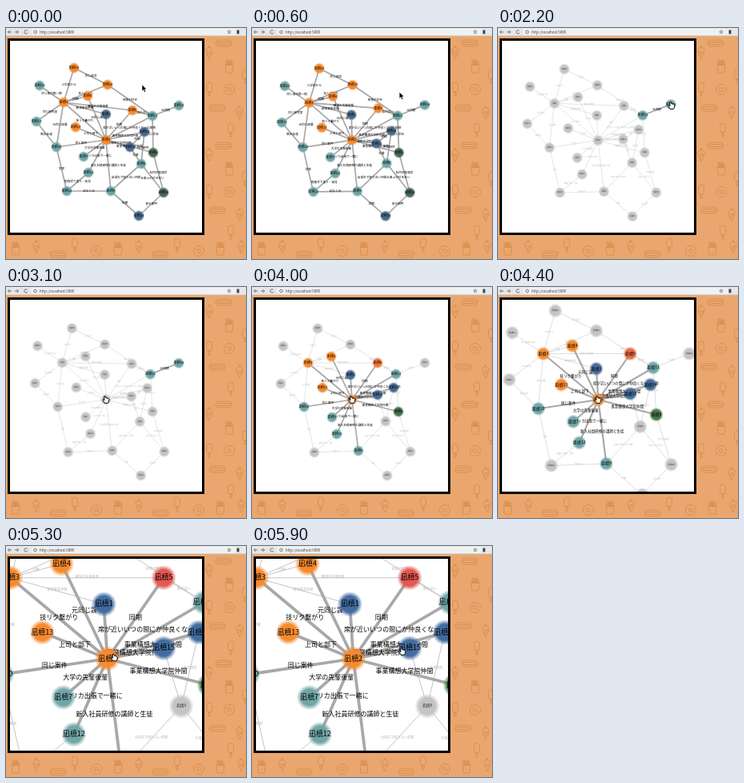
Recreate the animation shown at these times as an HTML page with a canvas. Size 300 px wide and 289 px high, loop 6 s.

```html
<!DOCTYPE html>
<html lang="ja">
<head>
<meta charset="utf-8">
<title>Graph</title>
<style>
html, body { margin: 0; width: 100%; height: 100%; overflow: hidden; background: #e9a76f; }
canvas { display: block; width: 300px; height: 289px; }
</style>
</head>
<body>
<canvas id="stage"></canvas>
<script>
const W = 300, H = 289, LOOP = 6000, STEP = 100;
const canvas = document.getElementById('stage');
const ctx = canvas.getContext('2d');
const ratio = window.devicePixelRatio || 1;
canvas.width = W * ratio;
canvas.height = H * ratio;

const FONT = '"Noto Sans CJK JP", "Noto Sans CJK", sans-serif';
const FAMILY = '凪槙';
const ORANGE = [246, 138, 46], TEAL = [112, 166, 167], BLUE = [66, 108, 160];
const GREEN = [66, 128, 68], RED = [227, 88, 80], GREY = [196, 196, 196];
// Colours that shift while the view zooms in
const early = new Map([[RED, ORANGE], [GREEN, [72, 104, 84]], [BLUE, [74, 106, 138]]]);

// id: start x, y, settled x, y, colour
const nodes = {
  19: [85, 50, 82, 52, ORANGE], 21: [42, 72, 39, 74, TEAL],
  20: [127, 71, 123, 72, ORANGE], 4: [102, 85, 99, 87, ORANGE],
  3: [72, 93, 70, 95, ORANGE], 5: [158, 103, 157, 95, RED],
  16: [216, 97, 216, 95, TEAL], 1: [125, 108, 123, 110, BLUE],
  11: [183, 110, 180, 109, TEAL], 14: [173, 130, 177, 126, BLUE],
  13: [87, 124, 88, 126, ORANGE], 17: [38, 117, 36, 121, TEAL],
  2: [125, 140, 125, 141, ORANGE], 15: [155, 149, 157, 135, BLUE],
  10: [63, 149, 65, 150, TEAL], 7: [97, 161, 100, 163, TEAL],
  12: [103, 181, 106, 184, TEAL], 6: [184, 156, 183, 156, GREEN],
  8: [169, 170, 167, 168, TEAL], 22: [76, 204, 78, 207, TEAL],
  9: [131, 204, 133, 205, TEAL], 18: [197, 206, 198, 206, GREEN],
  23: [166, 235, 169, 236, BLUE]
};

const links = [
  [2, 1, ''], [2, 4, '元同じ課'], [2, 3, '技リク繋がり'], [2, 13, '上司と部下'],
  [2, 5, '同期'], [2, 11, '席が近いいつの間にか仲良くなった間柄'],
  [2, 14, '事業構想大学院仲間'], [2, 15, '事業構想大学院仲間'],
  [2, 6, '事業構想大学院仲間'], [2, 10, '同じ案件'], [2, 7, '大学の先輩後輩'],
  [2, 12, 'アメリカ出張で一緒に'], [2, 9, '新入社員研修の講師と生徒'],
  [16, 11, '元同期'], [19, 3, '小学校から'], [19, 20, '同じ部活'],
  [21, 3, '同じ部の第一期'], [20, 3, '友人の紹介'], [20, 11, '技術が好き'],
  [3, 4, '同期'], [3, 5, '職場の先輩後輩'], [3, 1, '新規事業仲間'],
  [3, 17, '同じ研究室'], [3, 10, '元同じ部署'], [17, 10, '飲み友達'],
  [10, 22, '実家'], [22, 9, '幼なじみ'], [12, 22, '勉強会で逢う・発見'],
  [9, 8, '出張先で知り合い仲間'], [9, 23, '同僚'], [23, 18, '昔の部門'],
  [8, 18, '仕事上の付き合い'], [6, 18, '社内の勉強会'], [11, 6, '同じ会社'],
  [5, 11, '席が近い'], [8, 14, '共同研究'], [14, 15, '仲間'], [15, 8, '先輩']
];

const touches = (hub, id) => id === hub || links.some(([a, b]) =>
  (a === hub && b === id) || (b === hub && a === id));

// Time tables: [ms, values...]
const allLit = [[0, 1], [900, 1], [1200, 0]];
const lit16 = [[0, 0], [900, 0], [1300, .65], [1500, 1], [3200, 1], [3400, 0]];
const lit2 = [[0, 0], [3200, 0], [3600, 1]];
const zoom = [[0, 0], [4120, 0], [4400, Math.log(1.25)], [4900, Math.log(1.91)], [5200, Math.log(2.2)]];
const warm = [[0, 0], [3500, 0], [4900, 1]];
const pointer = [[0, 170, 71], [500, 176, 76], [1000, 217, 97], [2700, 217, 97],
  [3100, 125, 141], [5200, 125, 141], [5800, 188, 132]];

const lerp = (a, b, p) => a + (b - a) * p;
const blend = (a, b, p) => a.map((v, i) => Math.round(lerp(v, b[i], p)));
const rgb = (c, alpha = 1) => `rgba(${c},${alpha})`;

function at(table, t, col = 1) {
  const i = table.findIndex(row => row[0] > t);
  if (i < 0) return table[table.length - 1][col];
  const a = table[i - 1], b = table[i];
  return lerp(a[col], b[col], (t - a[0]) / (b[0] - a[0]));
}

function text(str, x, y, size, color, align = 'center', weight = 500) {
  ctx.font = `${weight} ${size}px ${FONT}`;
  ctx.textAlign = align;
  ctx.textBaseline = 'middle';
  ctx.fillStyle = color;
  ctx.fillText(str, x, y);
}

function line(points, closed) {
  ctx.beginPath();
  points.forEach(([x, y]) => ctx.lineTo(x, y));
  if (closed) ctx.closePath();
  ctx.stroke();
}

function ring(x, y, r) {
  ctx.beginPath();
  ctx.arc(x, y, r, 0, 7);
  ctx.stroke();
}

function pill(x, y, w, h, r) {
  ctx.beginPath();
  ctx.roundRect(x, y, w, h, r);
}

const icons = {
  fries() {
    line([[-5, -1], [5, -1], [4, 9], [-4, 9]], true);
    [-4, -2, 0, 2].forEach((x, i) => ctx.strokeRect(x, -7 + i % 2 * 2, 2, 6 - i % 2 * 2));
  },
  cone() {
    line([[-4, 0], [4, 0], [0, 9]], true);
    ctx.beginPath();
    ctx.arc(0, -1, 4.5, Math.PI, 0);
    ctx.stroke();
    line([[-2, 4], [2, 1]]);
    ring(0, -6.5, 1);
  },
  hotdog() {
    pill(-10, -4, 20, 8, 4);
    ctx.stroke();
    pill(-8, -1.5, 16, 3, 1.5);
    ctx.stroke();
  },
  donut() {
    ring(0, 0, 6.5);
    ring(0, 0, 2.3);
    line([[-4, -2], [-3, -3]]);
    line([[3, 3], [4, 2]]);
  },
  pop() {
    pill(-3.5, -8, 7, 12, 3.5);
    ctx.stroke();
    ctx.strokeRect(-1, 4, 2, 5);
  }
};

function icon(name, x, y) {
  ctx.save();
  ctx.translate(x, y);
  icons[name]();
  ctx.restore();
}

function drawToolbar() {
  ctx.fillStyle = '#e6e7e9';
  ctx.fillRect(0, 0, W, 10);
  ctx.fillStyle = '#f0f1f3';
  pill(31, 1, 257, 8, 4);
  ctx.fill();
  ctx.fillStyle = '#c9c4bf';
  ctx.fillRect(0, 9.5, W, .8);
  ctx.strokeStyle = '#555';
  ctx.lineWidth = .8;
  line([[7, 5], [2.5, 5], [4.5, 3]]);
  line([[2.5, 5], [4.5, 7]]);
  line([[11, 5], [15.5, 5], [13.5, 3]]);
  line([[15.5, 5], [13.5, 7]]);
  ctx.beginPath();
  ctx.arc(25, 5, 2.2, .4, 5.6);
  ctx.stroke();
  ring(36.5, 5, 1.8);
  text('http://localhost:5000', 42, 5, 4.4, '#333', 'left', 400);
  const star = Array.from({ length: 10 }, (_, i) => {
    const r = i % 2 ? 1 : 2.3, angle = i * Math.PI / 5;
    return [279 + r * Math.sin(angle), 5 - r * Math.cos(angle)];
  });
  ctx.lineWidth = .6;
  line(star, true);
  ctx.fillStyle = '#444';
  pill(288.5, 2.5, 3, 5, 1);
  ctx.fill();
}

function drawPage() {
  ctx.fillStyle = '#e9a76f';
  ctx.fillRect(0, 0, W, H);
  ctx.strokeStyle = '#d98848';
  ctx.lineWidth = .8;
  const side = [['hotdog', 272, 19], ['cone', 254, 30], ['fries', 279, 47], ['donut', 279, 77],
    ['pop', 254, 76], ['cone', 292, 105], ['hotdog', 264, 100], ['pop', 281, 127], ['pop', 299, 60]];
  for (let y = 0; y < 250; y += 128)
    side.forEach(([name, x, top]) => top + y < 260 && icon(name, x, top + y));
  const foot = [['fries', 12, 275], ['cone', 38, 273], ['hotdog', 65, 283], ['pop', 86, 271], ['donut', 113, 279]];
  for (let x = 0; x < W; x += 128)
    foot.forEach(([name, left, y]) => icon(name, left + x, y));

  drawToolbar();
  ctx.fillStyle = '#000';
  ctx.fillRect(2, 13, 246, 246);
  ctx.fillStyle = '#fff';
  ctx.fillRect(5, 16, 240, 240);
}

function drawGraph(t) {
  const k = Math.exp(at(zoom, t));
  const drift = Math.min(1, (t / 4000) ** .6);
  const all = at(allLit, t), a = at(lit16, t), g = at(lit2, t), shift = at(warm, t);
  const light = (in16, in2) => Math.max(all, in16 ? a : 0, in2 ? g : 0);
  const place = id => {
    const [x0, y0, x1, y1] = nodes[id];
    return [
      125 + (k - 1) * 1.4 + (lerp(x0, x1, drift) - 125) * k,
      141 + (lerp(y0, y1, drift) - 141) * k
    ];
  };
  const edges = links.map(([from, to, label]) => ({
    p: place(from), q: place(to), label,
    on: light(from === 16 || to === 16, from === 2 || to === 2)
  })).sort((m, n) => m.on - n.on);

  ctx.save();
  ctx.beginPath();
  ctx.rect(5, 16, 240, 240);
  ctx.clip();

  for (const { p, q, on } of edges) {
    ctx.strokeStyle = rgb(blend([196, 196, 196], [168, 168, 168], on));
    ctx.lineWidth = lerp(.45, 1.7, on) * k;
    line([p, q]);
  }
  for (const { p, q, label, on } of edges) {
    text(label, (p[0] + q[0]) / 2, (p[1] + q[1]) / 2 - .7 * k,
      lerp(1.9, 3.65, on) * k, rgb(blend([182, 182, 182], [0, 0, 0], on)));
  }
  for (const id of Object.keys(nodes).map(Number)) {
    const [x, y] = place(id);
    const on = light(touches(16, id), touches(2, id));
    const full = nodes[id][4];
    const color = blend(GREY, blend(early.get(full) || full, full, shift), on);
    const r = 7.2 * k;
    const fill = ctx.createRadialGradient(x, y, 0, x, y, r);
    fill.addColorStop(0, rgb(color));
    fill.addColorStop(.64, rgb(color));
    fill.addColorStop(1, rgb(color, 0));
    ctx.fillStyle = fill;
    ctx.beginPath();
    ctx.arc(x, y, r, 0, 7);
    ctx.fill();
    text(FAMILY + id, x, y - .4 * k, lerp(2.1, 4.05, on) * k, rgb(blend([40, 40, 40], [0, 0, 0], on)));
  }
  ctx.restore();
}

function drawPointer(t) {
  const hand = (t >= 1000 && t < 2800) || t >= 3100;
  const shape = hand
    ? [[-2.5, -5], [-1, -5], [0, -2.5], [3, -2], [4.5, -.5], [4, 3], [2.5, 5], [-2, 5], [-5, .5], [-4, -.5], [-2.5, 1]]
    : [[0, 0], [0, 8], [1.8, 6.3], [3.2, 9.3], [4.6, 8.6], [3.3, 5.8], [5.8, 5.6]];
  ctx.save();
  ctx.translate(at(pointer, t, 1), at(pointer, t, 2));
  if (hand) ctx.scale(.85, .85);
  ctx.fillStyle = hand ? '#fff' : '#000';
  ctx.strokeStyle = hand ? '#000' : '#fff';
  ctx.lineWidth = hand ? 1 : .5;
  line(shape, true);
  ctx.fill();
  ctx.stroke();
  ctx.restore();
}

function draw(now) {
  const t = Math.floor((now % LOOP) / STEP) * STEP;
  ctx.setTransform(ratio, 0, 0, ratio, 0, 0);
  drawPage();
  drawGraph(t);
  drawPointer(t);
}

const start = performance.now();
function tick() {
  draw(performance.now() - start);
  requestAnimationFrame(tick);
}
tick();
</script>
</body>
</html>
```
